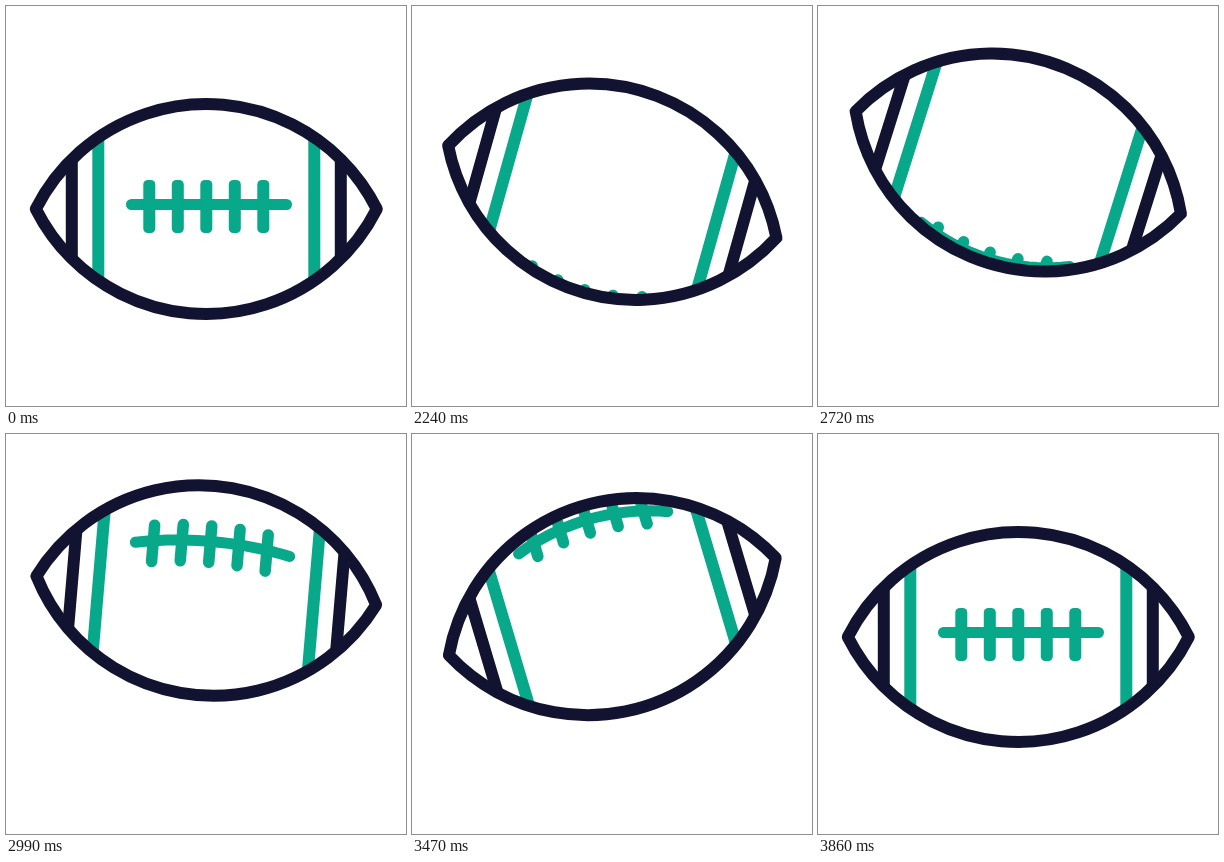
An HTML page with a canvas for the animation above (3890 ms loop, 400 by 400 pixels).

```html
<!DOCTYPE html>
<html lang="en">
<head>
<meta charset="utf-8">
<title>Spinning ball</title>
<style>
html, body { margin: 0; width: 100%; height: 100%; overflow: hidden; background: #fff; }
canvas { display: block; width: 400px; height: 400px; }
</style>
</head>
<body>
<canvas id="stage" width="400" height="400"></canvas>
<script>
const ctx = document.getElementById('stage').getContext('2d');
const NAVY = '#121331', GREEN = '#08a88a';
const LOOP = 3890, HOLD = 2030, STEP = 30, END = 1860;
const CX = 200.3, CY = 203;

// The outline is two equal arcs meeting at the tips.
const HALF = 170.5, SAG = 105;
const RAD = (HALF * HALF + SAG * SAG) / (2 * SAG);
const DROP = RAD - SAG;

const REST = -2.5;  // roll angle of the laces at rest
const TURN = 203;   // degrees per roll, the far side is skipped
const TICK_GAP = 28.5, BAR_FROM = -74.8, BAR_TO = 80.2;

const sin = deg => Math.sin(deg * Math.PI / 180);
const profile = x => Math.sqrt(RAD * RAD - x * x) - DROP;

// Progress 0..1 between two times, with optional start and end speed.
function ease(t, from, to, a = 0, b = 0) {
  const u = Math.min(1, Math.max(0, (t - from) / (to - from)));
  return u * u * (3 - 2 * u) + a * u * (1 - u) ** 2 - b * u * u * (1 - u);
}

const tiltAt = t => 23.8 * ease(t, 0, 420, 0.5)
  - 43.1 * ease(t, 420, 1660) + 19.3 * ease(t, 1660, END);

const liftAt = t => 46.5 * (ease(t, 0, 580) - ease(t, 1100, END, 0, 1.1));

function rollAt(t) {
  const p = 1 - (1 - Math.min(1, t / 1650)) ** 1.07;
  const roll = REST + 3 * TURN * p;
  return (roll + TURN / 2) % TURN - TURN / 2;
}

function lens() {
  const a = Math.atan2(DROP, HALF);
  ctx.beginPath();
  ctx.arc(0, DROP, RAD, Math.PI + a, -a);
  ctx.arc(0, -DROP, RAD, a, Math.PI - a);
  ctx.closePath();
}

function line(x1, y1, x2, y2, color, width) {
  ctx.strokeStyle = color;
  ctx.lineWidth = width;
  ctx.beginPath();
  ctx.moveTo(x1, y1);
  ctx.lineTo(x2, y2);
  ctx.stroke();
}

function restLaces() {
  line(BAR_FROM, -4.5, BAR_TO, -4.5, GREEN, 11);
  ctx.fillStyle = GREEN;
  for (let i = -2; i <= 2; i++) {
    ctx.beginPath();
    ctx.roundRect(i * TICK_GAP - 6, -29, 12, 53, 4.5);
    ctx.fill();
  }
}

function laces(roll) {
  const s = sin(roll);
  ctx.strokeStyle = GREEN;
  ctx.lineWidth = 11;
  ctx.beginPath();
  for (let i = 0; i <= 20; i++) {
    const x = BAR_FROM + (BAR_TO - BAR_FROM) * i / 20;
    ctx.lineTo(x, profile(x) * s);
  }
  ctx.stroke();
  const up = SAG * (sin(roll - 10.1) - s);
  const down = SAG * (sin(roll + 12.3) - s);
  for (let i = -2; i <= 2; i++) {
    const x = i * TICK_GAP, y = profile(x) * s;
    line(x, y + up, x, y + down, GREEN, 11.5);
  }
}

function draw(t) {
  const s = t < HOLD ? 0 : Math.min(END, (Math.floor((t - HOLD) / STEP) + 1) * STEP);

  ctx.fillStyle = '#fff';
  ctx.fillRect(0, 0, 400, 400);
  ctx.save();
  ctx.translate(CX, CY - liftAt(s));
  ctx.rotate(tiltAt(s) * Math.PI / 180);
  ctx.lineCap = ctx.lineJoin = 'round';

  ctx.save();
  lens();
  ctx.clip();
  for (const side of [-1, 1]) {
    line(side * 134.5, -SAG, side * 134.5, SAG, NAVY, 12);
    line(side * 108, -SAG, side * 108, SAG, GREEN, 12);
  }
  const roll = rollAt(s);
  if (s % END === 0) restLaces();
  else if (Math.abs(roll) < 92) laces(roll);
  ctx.restore();

  lens();
  ctx.strokeStyle = NAVY;
  ctx.lineWidth = 12;
  ctx.stroke();
  ctx.restore();
}

function frame() {
  draw(performance.now() % LOOP);
  requestAnimationFrame(frame);
}
frame();
</script>
</body>
</html>
```
